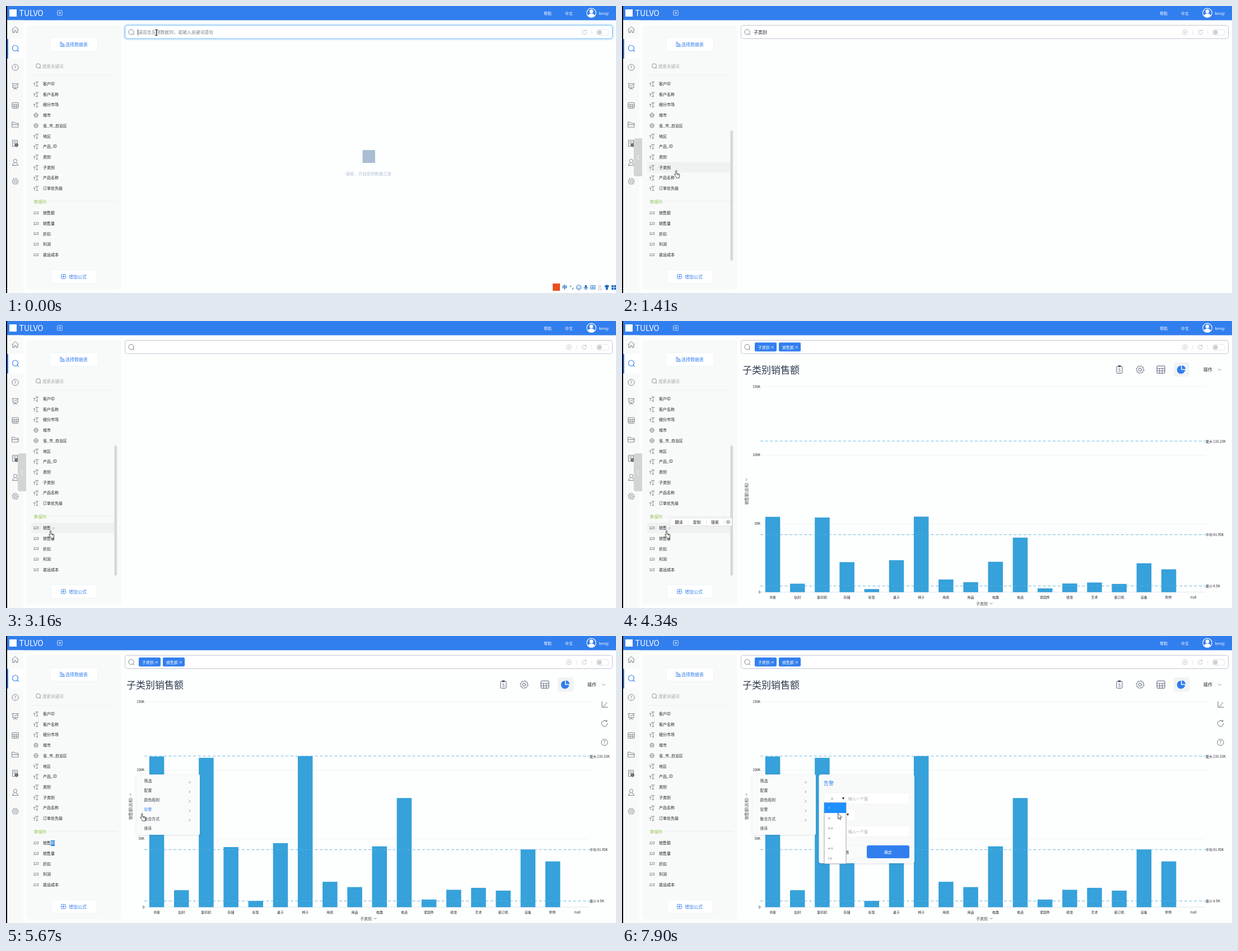
Write an HTML page that moves like this. It is 1089 px wide and 514 px high and loops after 7.99 s.

```html
<!DOCTYPE html>
<html lang="zh-CN">
<head>
<meta charset="utf-8">
<title>数据搜索</title>
<style>
html, body { margin: 0; width: 100%; height: 100%; overflow: hidden; background: #fdfefe; }
svg { display: block; width: 100%; height: 100%; }
text { font-family: "Noto Sans CJK SC", "Noto Sans CJK", "Noto Sans", sans-serif; white-space: pre; }
.shade { filter: drop-shadow(0 1px 2px rgba(60, 80, 100, .16)); }
</style>
</head>
<body>
<svg id="stage" viewBox="0 0 1089 514" preserveAspectRatio="none"></svg>
<script>
const LOOP = 7990;
const BLUE = '#317eee', INK = '#1d2126', GREY = '#6b7177', PALE = '#b4b9be', BAR = '#36a1da';

// ---- drawing helpers (text is placed by its vertical centre) ----
const text = (x, y, s, size = 7, fill = INK, anchor = 'start', more = '') =>
  `<text x="${x}" y="${y + size * .36}" font-size="${size}" fill="${fill}" text-anchor="${anchor}" ${more}>${s}</text>`;
const rect = (x, y, w, h, fill, r = 0, more = '') =>
  `<rect x="${x}" y="${y}" width="${w}" height="${h}" rx="${r}" fill="${fill}" ${more}/>`;
const line = (d, color = GREY, w = .9, fill = 'none') =>
  `<path d="${d}" fill="${fill}" stroke="${color}" stroke-width="${w}" stroke-linecap="round" stroke-linejoin="round"/>`;
const ring = (x, y, r, color = GREY, w = .9, fill = 'none') =>
  `<circle cx="${x}" cy="${y}" r="${r}" fill="${fill}" stroke="${color}" stroke-width="${w}"/>`;
const box = (x, y, w, h, color = GREY, r = 0, fill = 'none', sw = .9) =>
  rect(x, y, w, h, fill, r, `stroke="${color}" stroke-width="${sw}"`);
const group = (id, inner, more = '') => `<g id="${id}" ${more}>${inner}</g>`;

const lens = (x, y, r, color, w = .9) =>
  ring(x, y, r, color, w) + line(`M${x + r * .7} ${y + r * .7}l${r * .5} ${r * .5}`, color, w);
const chevron = (x, y, s, color = GREY) => line(`M${x - s / 2} ${y - s}l${s} ${s}l${-s} ${s}`, color, .8);
const down = (x, y, s, color = GREY) => line(`M${x - s} ${y - s / 2}l${s} ${s}l${s} ${-s}`, color, .8);
const cross = (x, y, s, color, w = .8) =>
  line(`M${x - s} ${y - s}l${2 * s} ${2 * s}M${x + s} ${y - s}l${-2 * s} ${2 * s}`, color, w);
const plusBox = (x, y, s, color) =>
  box(x - s, y - s, 2 * s, 2 * s, color, 1) + line(`M${x - 2} ${y}h4M${x} ${y - 2}v4`, color);
const help = (x, y, color) => ring(x, y, 5.6, color) + text(x, y, '?', 8, color, 'middle');
const gear = (x, y, r, color = GREY, w = .9) => {
  let d = '';
  for (let i = 0; i < 32; i++) {
    const a = (i + .5) * Math.PI / 16, q = i % 4 < 2 ? r : r * .8;
    d += `${i ? 'L' : 'M'}${(x + q * Math.cos(a)).toFixed(2)} ${(y + q * Math.sin(a)).toFixed(2)}`;
  }
  return line(d + 'Z', color, w) + ring(x, y, r * .38, color, w);
};
const grid = (x, y, w, h, color) => box(x - w / 2, y - h / 2, w, h, color, .8) +
  line(`M${x - w / 2} ${y - h / 6}h${w}M${x - w / 2} ${y + h / 6}h${w}M${x - w / 6} ${y - h / 6}v${h * .66}M${x + w / 6} ${y - h / 6}v${h * .66}`, color, .8);
const reload = (x, y, r, color) =>
  line(`M${x + r} ${y}A${r} ${r} 0 1 1 ${x + r * .7} ${y - r * .7}M${x + r * .8} ${y - r * 1.15}v${r * .5}h${-r * .5}`, color);

// ---- page parts ----
function header() {
  return rect(0, 0, 1089, 25.5, BLUE) + rect(6, 6, 13, 13, '#fff') +
    text(23.5, 13, 'TULVO', 14, '#fff') + plusBox(96, 12.5, 4.3, '#dbe8fd') +
    text(960, 13, '帮助', 7, '#fff') + text(998, 13, '中文', 7, '#fff') +
    ring(1045, 12.3, 8.2, '#fff', 1.1) + ring(1045, 9.8, 3.2, '#fff', .5, '#fff') +
    line('M1039 17.5q1-3.8 6-3.8t6 3.8q-2.5 2.4-6 2.4t-6-2.4Z', '#fff', .4, '#fff') +
    text(1058.5, 13, 'tenqi', 7.2, '#fff');
}

function rail() {
  const c = '#70767c';
  return rect(2, 25.5, 29, 489, '#f8f9f9') + rect(2, 59, 29, 35, '#fff') + rect(2, 59, 2, 35, BLUE) +
    line('M11 42l5.500-5.500l5.500 5.500M12 41.500v6h3v-3.500h3v3.500h3v-6', c) +
    lens(16.5, 75.5, 5, BLUE, 1.1) + help(16.5, 110, c) +
    line('M11 139h11M12 139v7.500h9v-7.500M16.500 146.500v1.500M13.500 149.500l3-2l3 2M13.500 144l2-2l2 1.500l2-2.500', c) +
    grid(16.5, 178, 11, 10, c) +
    line('M11 208h4l1.500 2h5.500v7h-11zM11 212.500h11', c) +
    line('M15 251.500h-3.500v-11h9v5M13.500 243.500h5M13.500 246h2.500', c) + gear(18.6, 249, 2.9, '#50565c', 1.2) +
    ring(16.5, 277.5, 3.1, c) + line('M11.500 285.500q0-3.500 3.500-4.500M18 281q3.500 1 3.500 4.500h-10', c) +
    gear(16.5, 314, 5.6, c);
}

const TEXT_COLS = ['客户ID', '客户名称', '细分市场', '城市', '省_市_自治区', '地区', '产品_ID', '类别', '子类别', '产品名称', '订单优先级'];
const NUM_COLS = ['销售', '销售量', '折扣', '利润', '装运成本'];
const ROWS = [...TEXT_COLS.map((_, i) => 139.5 + i * 18.7), ...NUM_COLS.map((_, i) => 370.8 + i * 18.7)];

function columnRow(name, i) {
  const y = ROWS[i];
  let icon;
  if (i >= TEXT_COLS.length) icon = text(48.5, y, '123', 6, '#3c4248');
  else if (i === 3 || i === 4) icon = ring(53.5, y, 3.8, GREY, .7) +
    line(`M49.7 ${y}h7.600M53.500 ${y - 3.8}q-3.400 3.800 0 7.600q3.400-3.800 0-7.600`, GREY, .6);
  else icon = line(`M52.5 ${y - 3.5}h5.500M55.300 ${y - 3.5}v7.500M53.800 ${y + 4}h3M49 ${y - .8}h3.500M50.800 ${y - .8}v4.500`, GREY, .8);
  return icon + text(66, y, name);
}

function panel() {
  return rect(36, 34, 170, 474, '#f8faf9', 6) +
    box(79, 57, 85, 24, '#eaeff3', 2, '#fff', .7) +
    line('M97 65v7.500h7.500M97 65h2.500v7M99.500 67.500h2.500v4.500M102 69h2v3.500', BLUE, .8) + text(106, 69, '选择数据表', 8, BLUE) +
    lens(57.5, 107.3, 4, GREY, .8) + text(65, 108, '搜索关键词', 7.5, '#a3a8ac') +
    rect(48, 123.7, 147, .7, '#e7eaea') + group('hover', rect(45, -9.3, 149, 18.6, '#f0f2f2')) +
    [...TEXT_COLS, ...NUM_COLS].map(columnRow).join('') +
    group('plain', text(80, ROWS[11], '额')) +
    group('mark', line('M83.500 370.500q1.500-1 2.500 0l-1.500 1.500v1', '#4b9bf0', .7)) +
    group('picked', rect(80, 366, 7, 10, '#1e7fe0') + text(80, ROWS[11], '额', 7, '#fff')) +
    text(50, 350, '数值列', 7.4, '#8cc04b') + rect(76, 349.5, 124, .7, '#e7eaea') +
    box(81, 472.5, 80.5, 24, '#eaeff3', 2, '#fff', .7) + plusBox(102.5, 484.5, 3.8, BLUE) + text(112, 485, '增加公式', 8, BLUE) +
    group('scroll', rect(193.5, 223, 4.5, 233, '#d5d7d7', 2) +
      `<path d="M36 237H25q-4 0-4 4v60q0 4 4 4h11z" fill="#d3d5d5"/>` + line('M30 267l-3.500 4l3.500 4', '#fff', 1));
}

const chip = (x, s) => rect(x, 38.5, 39, 16, BLUE, 2) + text(x + 5.7, 47, s, 7, '#fff') + cross(x + 31.7, 47, 2, '#fff');

function searchBar() {
  const bar = (color, more) => rect(212.5, 34.5, 870, 24, '#fff', 4, `stroke="${color}" ${more}`);
  return group('calm', bar('#b9c1cd', 'stroke-width=".9"')) +
    group('glow', bar('#7cc0f8', 'stroke-width="1.2" style="filter:drop-shadow(0 0 2px #8ccbff)"')) +
    lens(223.5, 46.5, 4.6, GREY) +
    group('hint', text(236, 47, '请双击左侧数据列，或输入关键词语句', 7.9, '#7b8085')) +
    group('caret', rect(235, 41.5, .8, 11, '#222')) +
    group('typed', text(235, 47, '子类别', 8)) +
    group('clear', ring(1005, 47, 4.4, PALE, .8) + cross(1005, 47, 1.6, PALE) + rect(1018.7, 44, .7, 7, '#d5d8db')) +
    reload(1032.5, 47, 3.8, PALE) + rect(1045.5, 44, .7, 7, '#d5d8db') +
    box(1054, 42, 22.5, 10.5, '#d9dcdf', 5.2, '#fff', .8) + ring(1059.5, 47.2, 4, '#c9cccf', .4, '#cfd2d4') +
    group('chip1', chip(237, '子类别')) + group('chip2', chip(280, '销售额'));
}

function welcome() {
  const c = '#1769c0', y = 504;
  return rect(636.5, 258, 22.5, 23, '#a9bed3') +
    text(647.5, 300.5, '- 搜索，开启您的数据之旅 -', 7.4, '#b0c1d2', 'middle') +
    rect(972, 496, 117, 16, '#fff') + rect(976, 497, 13, 13, '#e8501f') +
    text(997.5, y, '中', 9, c, 'middle', 'font-weight="700"') +
    ring(1008, 502, 1, c, .8) + line('M1012.500 505l-1 2', c, 1.3) +
    ring(1022.5, y, 4.2, c, 1) + line('M1020.300 505q2.200 2.500 4.400 0M1021 502.500v.3M1024 502.500v.3', c, 1) +
    rect(1033.5, 499.5, 3.4, 6, c, 1.7) + line('M1032 503.500q0 3.500 3.200 3.500t3.200-3.500M1035.200 507v1.500', c) +
    box(1043.5, 500.5, 8.5, 6.5, c, 1) + line('M1045.500 503h4.500M1045.500 505h4.500', c, 1) +
    ring(1060, 502, 2, '#a8bdd2') + line('M1057 508q0-3 3-3t3 3z', '#a8bdd2') +
    line('M1069 501.500l2.500-1.500h2.500l2.500 1.500l-1.300 2l-1-.5v5h-3v-5l-1 .5z', c, .8, c) +
    [0, 1, 2, 3].map(i => rect(1081 + i % 2 * 4.5, 500 + (i >> 1) * 4.5, 3.6, 3.6, c)).join('');
}

function toolbar() {
  const c = '#44536a';
  return box(883, 81, 10, 12.5, c, 1.5) + rect(885.5, 79.5, 5, 3, c, 1) + text(888, 88, 'S', 7.5, c, 'middle') +
    gear(925, 87, 7, c) + grid(962, 87, 14, 13, c) +
    rect(985, 74, 28, 25.5, '#f1f3f4', 4) +
    `<path d="M998 87.500V80a7.300 7.300 0 1 0 7.300 7.500z" fill="${BLUE}"/><path d="M999.500 86V79.500a6.800 6.800 0 0 1 6.500 6.500z" fill="${BLUE}"/>` +
    text(1038, 87, '操作', 8) + down(1067, 87.3, 2.6);
}

const NAMES = '书架 信封 复印机 存储 标签 桌子 椅子 用具 用品 电器 电话 紧固件 纸张 艺术 装订机 设备 附件 null'.split(' ');
const HEIGHTS = [270, 30.5, 267.5, 107.7, 11.2, 114.7, 270.7, 45.5, 36, 109, 195.5, 13.7, 31.2, 34.7, 29.7, 103.5, 82, 0];
const BASE = 485.7;

function chart() {
  const mid = i => 269 + i * 44.19;
  const ticks = ['0', '50K', '100K', '150K'].map((s, i) => {
    const y = BASE - i * 122.7;
    return rect(247, y - .4, 795, .8, i ? '#eef0f0' : '#dfe3e6') + text(247, y, s, 6, INK, 'end');
  }).join('');
  const levels = [[215, '最大 110.23K'], [382.6, '平均 41.95K'], [474.6, '最小 4.5K']].map(([y, s]) =>
    `<path d="M247 ${y}H1042" stroke="#58b2df" stroke-width=".9" stroke-dasharray="5 3.700"/>` + text(1042, y + .5, s, 6)).join('');
  return ticks +
    group('bars', HEIGHTS.map((h, i) => rect(mid(i) - 13.2, -h, 26.5, h, BAR)).join('')) + levels +
    NAMES.map((s, i) => text(mid(i), 495, s, 6, INK, 'middle')).join('') +
    text(632, 506.3, '子类别', 7, '#444') + down(659, 506, 2, '#666') +
    text(0, 0, '销售额(总和)', 7, '#444', 'start', 'transform="translate(222.500 329) rotate(-90)"') + chevron(222.3, 284, 2, '#666');
}

function sideTools() {
  const c = '#56616d';
  return line('M1064 117.500v10h10M1066.500 125.500q4-1 6-6.500', c) + reload(1068.5, 156.5, 5.3, c) + help(1068.5, 190.5, c);
}

function wordTip() {
  return box(85.5, 352.5, 111, 14.5, '#d4d6d8', 1, '#fff', .8) +
    [117.5, 150, 182.5].map(x => rect(x, 352.5, .7, 14.5, '#dcdee0')).join('') +
    ['翻译', '复制', '搜索'].map((s, i) => text(101.5 + i * 32.3, 360, s, 7, INK, 'middle')).join('') + gear(189.5, 360, 3.2, GREY, .8);
}

const MENU = ['筛选', '配置', '颜色规则', '告警', '聚合方式', '排序'];
function menu() {
  return rect(233, 248, 113, 108, '#f9fbfb', 2, 'class="shade"') + MENU.map((s, i) =>
    text(246.5, 260 + i * 17, s, 6.9, '#333a42', 'start', 'class="item"') + (i < 5 ? chevron(328, 262 + i * 17, 1.9) : '')).join('');
}

const arrowDown = (x, y) => `<path d="M${x - 2} ${y - 1.7}h4l-2 3.700z" fill="#111"/>`;
function dialog() {
  const valueRow = y => box(360.5, y - 10, 152.5, 20, '#edf0f1', 2, '#fff', .7) +
    text(373, y + .5, '=', 7) + arrowDown(395, y) + text(404, y, '输入一个值', 7, '#a2a7ac');
  return rect(351.5, 248, 170.5, 159, '#f8fafa', 4, 'class="shade"') + text(360, 263.5, '告警', 9, BLUE) +
    valueRow(291) + box(360.5, 310, 56, 20.5, '#edf0f1', 2, '#fff', .7) + arrowDown(403, 320) + valueRow(350) +
    box(360.5, 375, 75, 23, '#eef1f2', 3, '#f9fbfb', .7) + text(398, 387, '取消', 7, INK, 'middle') +
    rect(437, 375, 76, 23, BLUE, 3) + text(475, 387, '确定', 7, '#fff', 'middle');
}

function options() {
  return box(361, 298.5, 39, 109.5, '#8a9099', 0, '#fff', .8) + rect(361, 298.5, 39, 18.5, '#1e90ff') +
    ['=', '&gt;', '&gt; =', '&lt;', '&lt; =', '! ='].map((s, i) => text(368, 308 + i * 18.2, s, 6.5, i ? INK : '#fff')).join('');
}

function pointers() {
  return group('ibeam', line('M-1.800-5h3.600M0-5v10M-1.800 5h3.600', '#111', 1)) +
    group('arrow', line('M0 0v9.500l2.200-2l1.500 3.500l1.500-.6l-1.500-3.500h3z', '#222', .8, '#fff')) +
    group('hand', line('M-1 1q0-1.500 1-1.500t1 1.500v4l4.200.8q1.500.4 1.300 2l-.8 3.200v2h-5.200v-1.500l-3.200-4q-.6-1.500.8-1.500l.9 1zM2.500 5.500v2M4.300 6v2', '#222', .8, '#fff'));
}

document.getElementById('stage').innerHTML =
  rect(0, 0, 1089, 514, '#fdfefe') + header() + rail() + rect(0, 0, 2, 514, '#000') + panel() + searchBar() +
  group('welcome', welcome()) +
  group('title1', text(215, 87.5, '子类别', 17, '#2d3a4d')) + group('title2', text(215, 87.5, '子类别销售额', 17, '#2d3a4d')) +
  group('tools', toolbar()) + group('chart', chart()) + group('side', sideTools()) +
  group('tip', wordTip()) + group('menu', menu()) + group('dialog', dialog()) + group('options', options()) +
  group('pointer', pointers());

// ---- motion ----
// bursts of picture changes: first, last, count
const BURSTS = [[0, 0, 1], [240, 1020, 11], [1090, 1170, 2], [1410, 1410, 1], [1790, 1960, 3], [2100, 2500, 6],
  [3000, 3000, 1], [3160, 3230, 2], [3710, 4470, 11], [4560, 5130, 8], [5340, 6040, 10], [6280, 6370, 2],
  [6510, 7210, 10], [7450, 7610, 3], [7750, 7900, 3]];
// pointer: time, x, y, shape from then on
const PATH = [[0, 268.5, 47.5, 'ibeam'], [170, 268.5, 47.5, 'ibeam'], [400, 232, 98, 'arrow'], [700, 128, 236, 'hand'],
  [1020, 96.5, 295, 'hand'], [1750, 96.5, 295, 'hand'], [1960, 104, 352, 'hand'], [2050, 104, 352, 'hand'],
  [2500, 79.5, 376, 'hand'], [4480, 79.5, 376, 'arrow'], [4795, 226.5, 315.5, 'hand'], [5400, 226.5, 315.5, 'hand'],
  [6040, 268, 322.5, 'hand'], [6200, 268, 322.5, 'hand'], [6370, 266, 318, 'hand'], [6640, 266, 318, 'hand'],
  [6800, 320, 306, 'arrow'], [7210, 382, 292, 'arrow'], [7400, 382, 292, 'arrow'], [7610, 392, 292.5, 'arrow'],
  [7700, 392, 292.5, 'arrow'], [7900, 385.5, 318, 'arrow']];

const $ = id => document.getElementById(id);
const show = (id, on) => { $(id).style.display = on ? '' : 'none'; };
const last = (list, t) => list.reduce((best, row, i) => row[0] <= t ? i : best, 0);

function snap(t) {
  const [a, b, n] = BURSTS[last(BURSTS, t)];
  if (n < 2) return a;
  const step = (b - a) / (n - 1);
  return a + step * Math.min(n - 1, Math.floor((t - a) / step + .2));
}

function pointerAt(t) {
  const i = last(PATH, t), [t0, x0, y0, kind] = PATH[i], next = PATH[i + 1];
  if (!next) return [x0, y0, kind];
  const k = (t - t0) / (next[0] - t0);
  return [x0 + (next[1] - x0) * k, y0 + (next[2] - y0) * k, kind];
}

const items = [...document.querySelectorAll('.item')];

function draw(now) {
  const t = snap(now), within = (a, b = LOOP) => t >= a && t < b;
  const [x, y, kind] = pointerAt(t);
  $('pointer').setAttribute('transform', `translate(${x} ${y})`);
  for (const k of ['ibeam', 'arrow', 'hand']) show(k, k === kind);

  const over = x > 45 && x < 194 ? ROWS.findIndex(r => Math.abs(r - y) <= 9.35) : -1;
  show('hover', over >= 0);
  if (over >= 0) $('hover').setAttribute('transform', `translate(0 ${ROWS[over]})`);
  show('scroll', x < 206);
  show('plain', !within(3000, 6510));
  show('mark', within(3000, 4480));
  show('picked', within(4480, 6510));

  show('glow', within(0, 930));
  show('calm', within(930));
  show('caret', within(0, 930));
  show('hint', within(0, 1410));
  show('welcome', within(0, 1090));
  show('typed', within(1410, 1790));
  show('clear', within(1410));

  const first = within(1940, 3160), full = within(3710);
  show('chip1', first || full);
  show('title1', first);
  show('tools', first || full);
  for (const id of ['chip2', 'title2', 'chart']) show(id, full);
  const k = Math.min(1, Math.max(0, (t - 3678) / 1280));
  $('bars').setAttribute('transform', `translate(0 ${BASE}) scale(1 ${(1 - Math.cos(Math.PI * k)) / 2})`);
  show('side', full && x > 212);

  show('tip', within(3930, 5340));
  show('menu', within(5340));
  const pick = t >= 5340 && x > 233 && x < 346 ? Math.floor((y - 251.5) / 17) : -1;
  items.forEach((el, i) => el.setAttribute('fill', i === pick ? BLUE : '#333a42'));
  show('dialog', within(6650));
  show('options', within(7750));
}

const begin = performance.now();
function tick() {
  draw((performance.now() - begin) % LOOP);
  requestAnimationFrame(tick);
}
tick();
</script>
</body>
</html>
```
